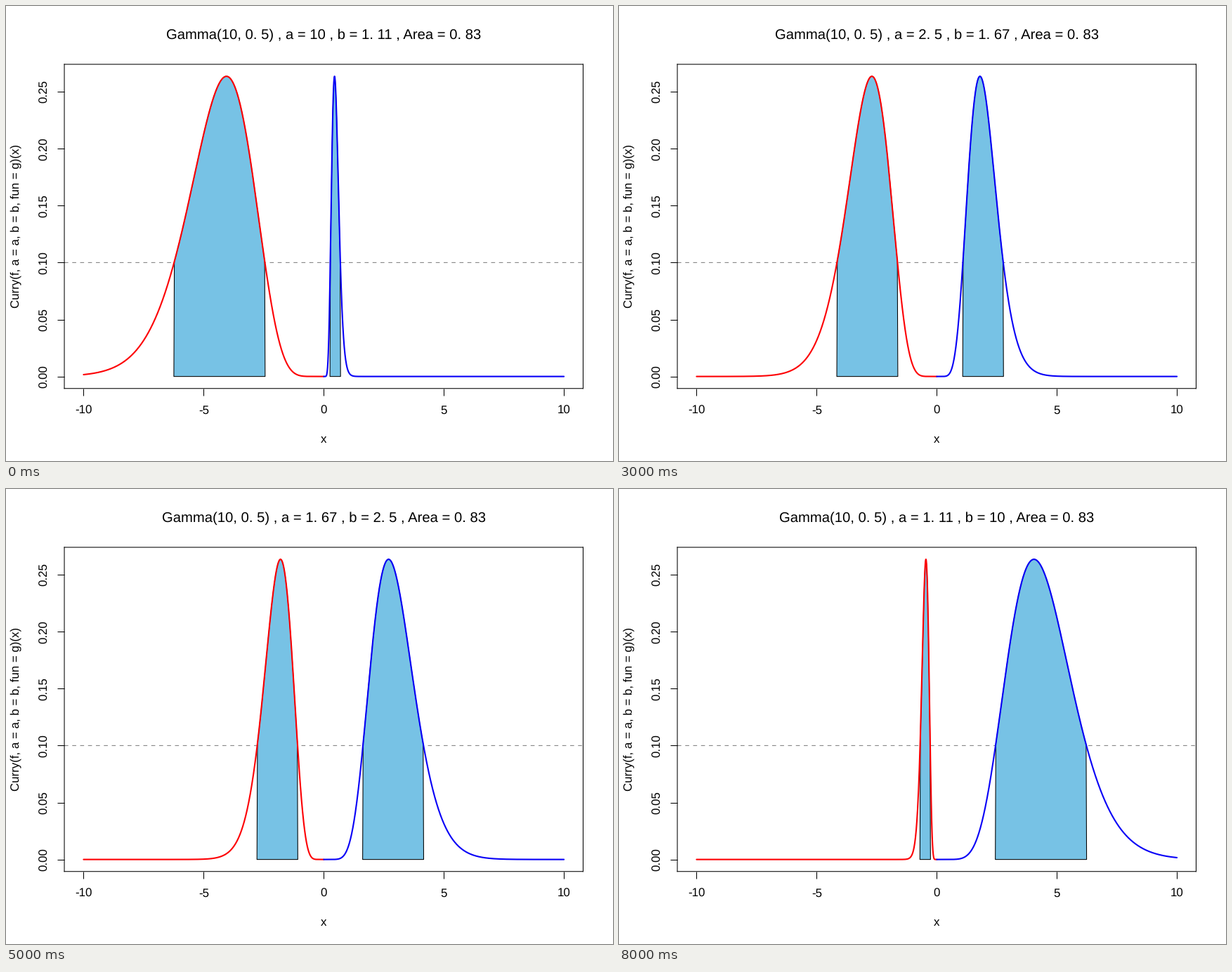
These frames come from a looping animation (864 by 648 pixels, 9000 ms). A matplotlib script:

```python
import math

import matplotlib.pyplot as plt
import numpy as np
from matplotlib.animation import FuncAnimation

W, H = 864, 648
LINE = 20.25          # height of one margin line
SIZE = LINE / 1.2     # base font size
THIN = 1.05
FRAMES = 9
SHAPE, SCALE = 10, 0.5
CUT = 0.1
STEP = 0.02
FILL, RED, BLUE = "#77c2e5", "#fd0004", "#0800f7"

plt.rcParams.update({
    "font.family": "Liberation Sans",
    "text.hinting": "none",
    "path.snap": False,
})


def density(x):
    """Gamma density, zero for negative x."""
    t = np.maximum(x, 0) / SCALE
    return t ** (SHAPE - 1) * np.exp(-t) / (math.gamma(SHAPE) * SCALE)


def number(v):
    return f"{round(v, 2):g}".replace(".", ". ")


def label(x, y, text, size=SIZE, rotation=0):
    """Text centred on x, y given in pixels from the top left."""
    return fig.text(x / W, 1 - y / H, text, size=size, rotation=rotation,
                    ha="center", va="baseline", rotation_mode="anchor")


left = top = 4.1 * LINE
right, bottom = W - 2.1 * LINE, H - 5.1 * LINE
peak = float(density(np.array((SHAPE - 1) * SCALE)))

fig = plt.figure(figsize=(W / 72, H / 72), dpi=72, facecolor="white")
ax = fig.add_axes([left / W, 1 - bottom / H,
                   (right - left) / W, (bottom - top) / H])
ax.set_xlim(-10.8, 10.8)
ax.set_ylim(-0.04 * peak, 1.04 * peak)
for spine in ax.spines.values():
    spine.set_linewidth(THIN)
xticks, yticks = np.arange(-10, 11, 5), np.arange(6) * 0.05
ax.set_xticks(xticks)
ax.set_yticks(yticks)
ax.tick_params(length=LINE / 2, width=THIN, labelbottom=False, labelleft=False)

mid_x, mid_y = (left + right) / 2, (top + bottom) / 2
for v in xticks:
    label(mid_x + v * (right - left) / 21.6, bottom + 1.8 * LINE, f"{v}")
for v in yticks:
    y = bottom - (v / peak + 0.04) / 1.08 * (bottom - top)
    label(left - 1.2 * LINE, y, f"{v:.2f}", rotation=90)
label(mid_x, bottom + 3.8 * LINE, "x")
label(left - 3.2 * LINE, mid_y, "Curry(f, a = a, b = b, fun = g)(x)", rotation=90)
title = label(mid_x, 47, "", size=1.2 * SIZE)

dash = 4 * LINE / 14.4
ax.plot([-10.8, 10.8], [CUT, CUT], color="#7f7f7f", lw=THIN, zorder=1,
        linestyle=(0, (dash / THIN, dash / THIN)))

grid = np.arange(0, 10 + STEP / 2, STEP)
fine = np.linspace(0, 10, 2001)


def half(color):
    area, = ax.fill([0, 0, 0], [0, 0, 0], facecolor=FILL, edgecolor="black",
                    lw=THIN, zorder=2, joinstyle="round")
    curve, = ax.plot([], [], color=color, lw=2 * THIN, zorder=3,
                     solid_capstyle="round", solid_joinstyle="round")
    return area, curve


def set_half(parts, sign, rate):
    area, curve = parts
    curve.set_data(sign * fine, density(rate * fine))
    x = grid[density(rate * grid) >= CUT]
    xs = np.concatenate([[x[0] - STEP], x, [x[-1] + STEP]])
    ys = np.concatenate([[0], density(rate * x), [0]])
    area.set_xy(np.column_stack([sign * xs, ys]))


negative, positive = half(RED), half(BLUE)


def draw(k):
    p = (k + 1) / (FRAMES + 1)
    a, b = 1 / p, 1 / (1 - p)
    set_half(negative, -1, b)
    set_half(positive, 1, a)
    title.set_text(f"Gamma({SHAPE}, {number(SCALE)}) , a = {number(a)} , "
                   f"b = {number(b)} , Area = 0. 83")
    return (*negative, *positive, title)


anim = FuncAnimation(fig, draw, frames=FRAMES, interval=1000,
                     repeat=True, repeat_delay=0, blit=False)
plt.show()
```
